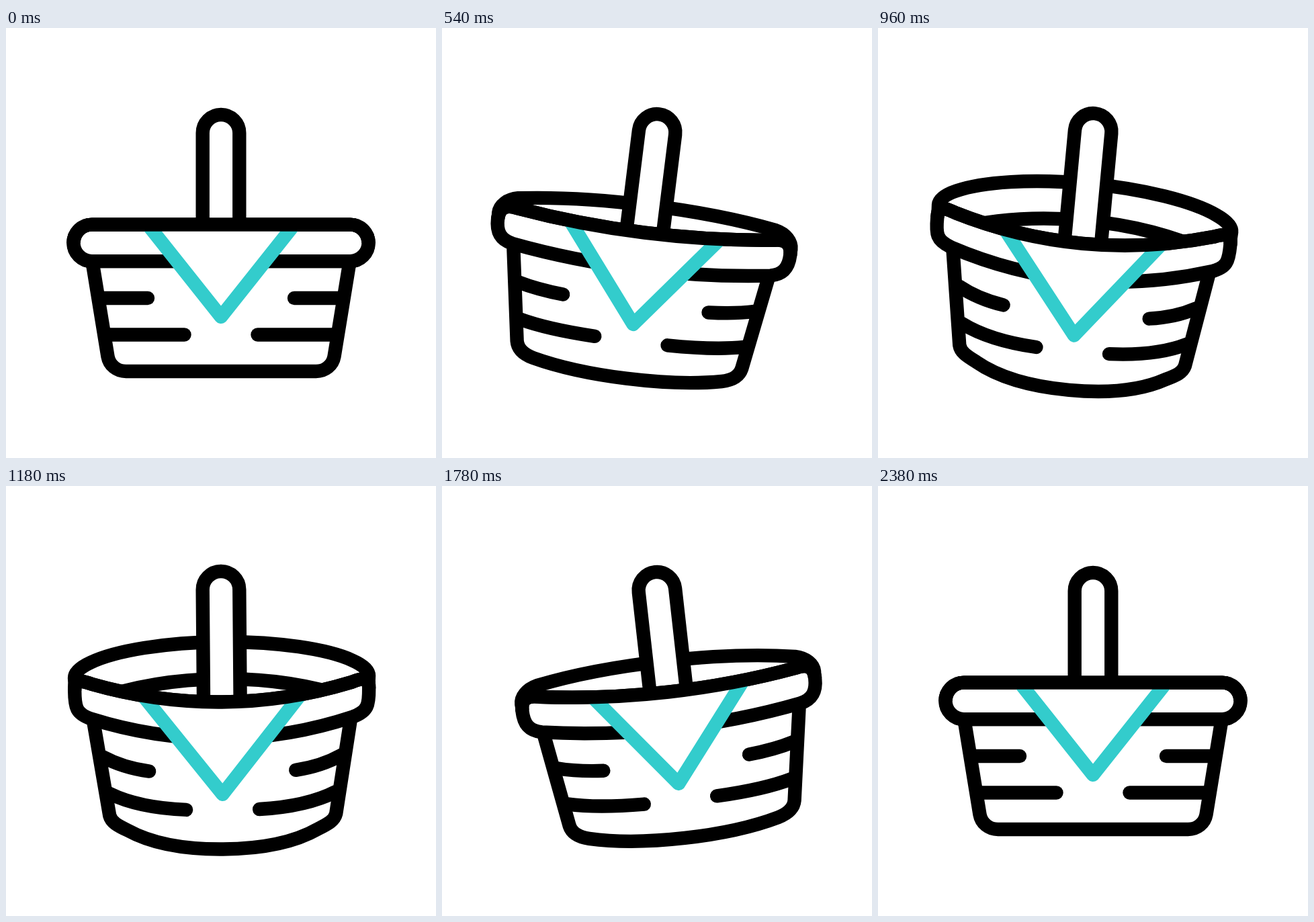
Recreate the animation shown at these times as an HTML page with a canvas. Size 640 by 640 pixels, loop 2.4 s.

```html
<!DOCTYPE html>
<html lang="en">
<head>
<meta charset="utf-8">
<title>Swinging basket</title>
<style>
  html, body { margin: 0; width: 100%; height: 100%; overflow: hidden; background: #fff; }
  canvas { display: block; width: 640px; height: 640px; }
</style>
</head>
<body>
<canvas id="stage" width="640" height="640"></canvas>
<script>
const ctx = document.getElementById('stage').getContext('2d');
const LOOP = 2400, CENTER = 320, PIVOT_Y = 156, STROKE = 20.4;
const INK = '#000', CLOTH = '#33cccc', PAPER = '#fff';

// Keyframes: [time, value], eased in and out between neighbours.
const SWING = [[0, 0], [720, 8.4], [1580, -7.6], [2380, 0], [LOOP, 0]];
const TILT = [[0, 0], [210, 0], [910, 1], [1410, 1], [2170, 0], [LOOP, 0]];

// Left halves of symmetric curves, from the side to the middle: a start and cubic segments.
const RIM_FLAT = [[100.5, 320], [100.5, 305], [112.7, 292.6], [127.8, 292.6],
                  [190, 292.6], [256, 292.6], [320, 292.6]];
const RIM_FLAT_LOW = RIM_FLAT.map(([x, y]) => [x, 639.7 - y]);
const BACK_TOP = [[101, 284], [101, 276], [110, 268], [125.6, 261],
                  [162, 244], [236, 232], [320, 232]];
const BACK_LOW = [[101, 284], [101, 305], [110, 324], [127, 318],
                  [190, 296], [256, 287], [320, 287]];
const FRONT_TOP = [[101, 303], [101, 290], [102, 284], [127, 293.5],
                   [190, 312], [256, 321.5], [320, 321.5]];
const FRONT_LOW = [[101, 303], [101, 328], [103, 337], [125, 345],
                   [190, 366], [256, 376], [320, 376]];
const BASE_FLAT = [[151.5, 489], [153.8, 502], [165.2, 511], [178.5, 511],
                   [225, 511], [272, 511], [320, 511]];
const BASE_TILTED = [[151.5, 489], [154, 499], [163, 504], [178.5, 511.5],
                     [215, 532], [266, 540.5], [320, 540.5]];
const SLATS = [
  { start: [143, 402], bend: [172, 418], end: [211, 402], drop: 21.7 },
  { start: [152, 456.5], bend: [195, 478], end: [265.5, 456.5], drop: 25 },
];

const lerp = (a, b, k) => a + (b - a) * k;
const mirror = ([x, y]) => [2 * CENTER - x, y];

function valueAt(keys, time) {
  const i = keys.findIndex(([t]) => t > time);
  const [t0, v0] = keys[i - 1], [t1, v1] = keys[i];
  const p = (time - t0) / (t1 - t0);
  return lerp(v0, v1, p * p * (3 - 2 * p));
}

function blend(flat, tilted, k) {
  return flat.map(([x, y], i) => [lerp(x, tilted[i][0], k), lerp(y, tilted[i][1], k)]);
}

function addCurves(path, pts) {
  for (let i = 1; i < pts.length; i += 3) {
    path.bezierCurveTo(...pts[i], ...pts[i + 1], ...pts[i + 2]);
  }
}

// Adds the curve from the left side to the right side, or back again.
function addSpan(path, half, reversed = false) {
  const left = reversed ? half.map(mirror) : half;
  addCurves(path, left);
  addCurves(path, left.map(mirror).reverse());
}

function spanPath(half) {
  const path = new Path2D();
  path.moveTo(...half[0]);
  addSpan(path, half);
  return path;
}

function ringPath(top, low) {
  const path = spanPath(top);
  addSpan(path, low, true);
  path.closePath();
  return path;
}

function paint(path, color = INK, fill = PAPER) {
  if (fill) {
    ctx.fillStyle = fill;
    ctx.fill(path);
  }
  ctx.strokeStyle = color;
  ctx.stroke(path);
}

function drawHandle(k) {
  const path = new Path2D(), r = 27.3, top = PIVOT_Y - 2 * k, bottom = 292.6 + 29 * k;
  path.moveTo(CENTER - r, bottom);
  path.arc(CENTER, top + 0.3, r, Math.PI, 2 * Math.PI);
  path.lineTo(CENTER + r, bottom);
  paint(path);
}

function drawBody(k) {
  const base = blend(BASE_FLAT, BASE_TILTED, k);
  const path = new Path2D();
  path.moveTo(128.3, 347);
  path.lineTo(...base[0]);
  addSpan(path, base);
  path.lineTo(...mirror([128.3, 347]));
  paint(path, INK, null);

  ctx.lineCap = 'round';
  for (const { start, bend, end, drop } of SLATS) {
    const pts = [start, [bend[0], lerp(start[1], bend[1], k)], [end[0], end[1] + drop * k]];
    for (const [a, b, c] of [pts, pts.map(mirror)]) {
      const slat = new Path2D();
      slat.moveTo(...a);
      slat.quadraticCurveTo(...b, ...c);
      paint(slat, INK, null);
    }
  }
  ctx.lineCap = 'butt';
}

function drawCloth(k, rim) {
  const below = spanPath(rim);
  below.lineTo(640, 700);
  below.lineTo(0, 700);
  below.closePath();

  const tipY = 429.8 + 29 * k, height = 160, halfWidth = height * 0.795;
  const cloth = new Path2D();
  cloth.moveTo(CENTER - halfWidth, tipY - height);
  cloth.lineTo(CENTER, tipY);
  cloth.lineTo(CENTER + halfWidth, tipY - height);

  ctx.save();
  ctx.clip(below);
  paint(cloth, CLOTH);
  ctx.restore();
}

function draw(time) {
  const k = valueAt(TILT, time);
  ctx.fillStyle = PAPER;
  ctx.fillRect(0, 0, 640, 640);
  ctx.save();
  ctx.translate(CENTER, PIVOT_Y);
  ctx.rotate(valueAt(SWING, time) * Math.PI / 180);
  ctx.translate(-CENTER, -PIVOT_Y);
  ctx.lineWidth = STROKE;
  ctx.lineJoin = 'round';

  const backTop = blend(RIM_FLAT, BACK_TOP, k);
  const backLow = blend(RIM_FLAT_LOW, BACK_LOW, k);
  const frontTop = blend(RIM_FLAT, FRONT_TOP, k);
  const frontLow = blend(RIM_FLAT_LOW, FRONT_LOW, k);

  paint(ringPath(backTop, backLow));
  drawHandle(k);
  drawBody(k);
  paint(ringPath(frontTop, frontLow));
  drawCloth(k, frontTop);
  paint(spanPath(frontTop), INK, null);
  ctx.restore();
}

function tick() {
  draw(performance.now() % LOOP);
  requestAnimationFrame(tick);
}
tick();
</script>
</body>
</html>
```
